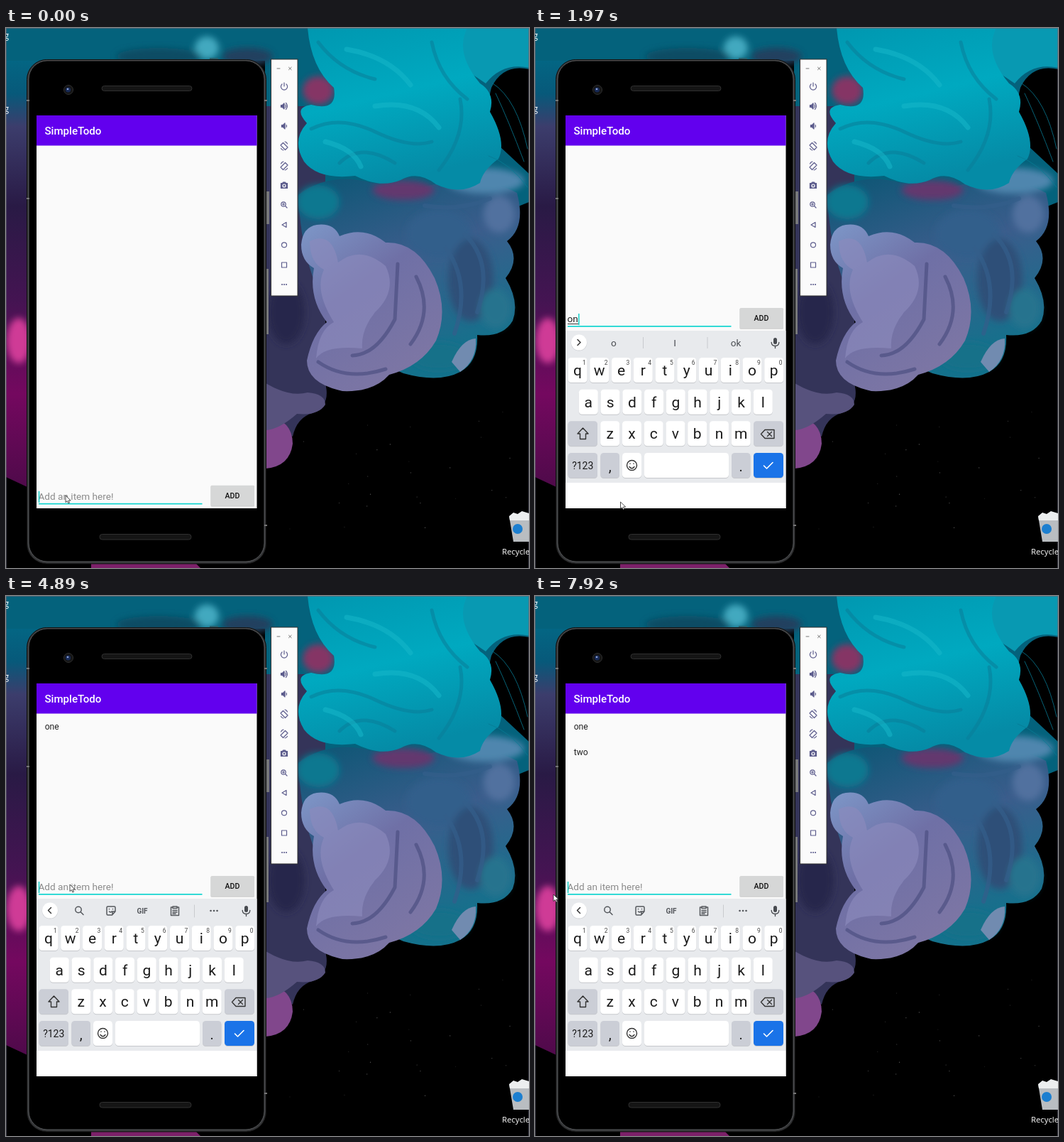
Recreate the animation shown at these times as an HTML page. Size 737x760 px, loop 8 s.

```html
<!DOCTYPE html>
<html lang="en">
<head>
<meta charset="utf-8">
<title>Todo list on a phone emulator</title>
<style>
html, body { margin: 0; width: 100%; height: 100%; overflow: hidden; background: #000; }
svg { display: block; width: 737px; height: 760px; }
text { font-family: Roboto, sans-serif; white-space: pre; }
.mid { text-anchor: middle; }
.line { fill: none; stroke-linecap: round; stroke-linejoin: round; }
</style>
</head>
<body>
<svg viewBox="0 0 737 760">
  <defs>
    <linearGradient id="left" gradientUnits="userSpaceOnUse" x1="0" y1="0" x2="0" y2="660">
      <stop offset="0" stop-color="#00728c"/><stop offset=".14" stop-color="#07597a"/>
      <stop offset=".21" stop-color="#3c3d6c"/><stop offset=".38" stop-color="#291a45"/>
      <stop offset=".58" stop-color="#441452"/><stop offset=".78" stop-color="#74085f"/>
      <stop offset="1" stop-color="#4b0a48"/>
    </linearGradient>
    <linearGradient id="cyan" x1="0" y1="0" x2=".3" y2="1">
      <stop offset="0" stop-color="#0097b0"/><stop offset=".5" stop-color="#00a9c0"/><stop offset="1" stop-color="#058ba6"/>
    </linearGradient>
    <linearGradient id="violet" x1="0" y1="0" x2=".6" y2="1">
      <stop offset="0" stop-color="#7d97c8"/><stop offset=".45" stop-color="#6f70a6"/><stop offset="1" stop-color="#7d76a4"/>
    </linearGradient>
    <linearGradient id="blue" x1="0" y1="0" x2=".4" y2="1">
      <stop offset="0" stop-color="#0b5674"/><stop offset=".5" stop-color="#3b5d8c"/><stop offset="1" stop-color="#14718c"/>
    </linearGradient>
    <filter id="soft" x="-20%" y="-20%" width="140%" height="140%"><feGaussianBlur stdDeviation="5"/></filter>
    <clipPath id="screen"><rect x="43" y="123" width="310.5" height="553"/></clipPath>
  </defs>

  <!-- wallpaper -->
  <rect width="737" height="760"/>
  <path fill="url(#left)" d="M0 0H60V660L0 632Z"/>
  <path fill="#04627c" d="M0 0H737V58Q700 50 684 84Q674 120 694 165L737 205V245L600 300H365V46H0Z"/>
  <path fill="#343459" d="M360 110H450V500Q458 532 432 542Q410 548 404 575L366 560Z"/>
  <path fill="#81478c" d="M366 545Q404 552 404 585Q400 617 366 620Z"/>
  <path fill="#57527d" d="M366 500Q400 520 425 513Q450 515 450 530Q440 546 410 543Q385 565 366 566Z"/>
  <path fill="url(#blue)" d="M412 235Q470 190 560 235Q650 195 720 232Q733 280 706 300Q726 325 704 352Q724 385 714 412Q700 436 664 432Q666 470 640 484Q610 500 560 486Q420 430 412 235Z"/>
  <g filter="url(#soft)">
    <ellipse cx="283" cy="28" rx="17" ry="16" fill="#43a9bf"/>
    <ellipse cx="215" cy="40" rx="60" ry="12" fill="#0b4c63"/>
    <ellipse cx="340" cy="40" rx="36" ry="12" fill="#24405f"/>
    <ellipse cx="18" cy="440" rx="17" ry="32" fill="#cf3a96"/>
    <ellipse cx="440" cy="88" rx="22" ry="20" fill="#853465"/>
    <ellipse cx="560" cy="228" rx="44" ry="14" fill="#64386e"/>
    <ellipse cx="440" cy="245" rx="30" ry="24" fill="#0a7890"/>
    <ellipse cx="675" cy="215" rx="55" ry="18" fill="#4f86ae"/>
    <ellipse cx="695" cy="262" rx="22" ry="26" fill="#51719f"/>
    <ellipse cx="610" cy="290" rx="46" ry="34" fill="#315f8b"/>
    <ellipse cx="655" cy="355" rx="32" ry="58" fill="#2e5078"/>
    <ellipse cx="690" cy="395" rx="22" ry="28" fill="#28738e"/>
    <ellipse cx="610" cy="462" rx="42" ry="20" fill="#127189"/>
    <ellipse cx="395" cy="400" rx="26" ry="45" fill="#28284c"/>
  </g>
  <path fill="#0899b2" d="M640 0H737V56Q700 48 676 78Q650 60 632 50Z"/>
  <path fill="url(#cyan)" d="M425 0H650Q632 35 668 78Q690 92 682 118Q706 160 694 184Q672 200 668 218Q640 236 606 220Q580 200 556 214Q528 226 492 208Q440 214 420 188Q402 158 424 134Q404 112 430 108Q468 118 462 84Q430 56 425 0Z"/>
  <path class="line" stroke="#0a7f99" stroke-width="5" opacity=".55" d="M440 20Q470 60 520 72M430 142Q470 122 520 146T600 160M470 190Q500 160 548 190M610 200Q650 150 640 100M600 20Q610 70 650 100"/>
  <path class="line" stroke="#18b9cc" stroke-width="7" opacity=".5" d="M480 30Q540 40 570 80M520 110Q580 100 610 140M450 160Q490 170 500 195"/>
  <path class="line" stroke="#087b94" opacity=".8" d="M686 78Q720 100 735 170M690 92Q708 130 730 188M680 180Q710 190 735 224"/>
  <path fill="url(#violet)" d="M416 305Q418 280 438 277Q462 274 470 293Q505 278 535 302Q578 300 604 352Q624 398 606 440Q585 476 540 488Q518 513 474 511Q424 500 424 468Q432 430 452 414Q426 380 434 338Q416 328 416 305Z"/>
  <path fill="#8c8bbd" opacity=".65" d="M428 300Q460 285 468 330Q500 305 535 335Q552 370 520 400Q500 425 502 451Q450 446 437 465Q440 425 462 414Q434 370 448 340Q428 330 428 300Z"/>
  <path class="line" stroke="#4b4d80" stroke-width="5" opacity=".65" d="M552 332Q550 374 548 410Q522 460 488 461M578 350Q604 400 570 445M440 470Q480 498 535 480"/>
  <path class="line" stroke="#345f8a" stroke-width="6" opacity=".7" d="M620 310Q656 360 632 430M646 290Q688 330 664 400M590 250Q640 258 682 240"/>
  <path fill="#718bb0" d="M628 470Q642 438 662 437Q664 468 640 484Z"/>
  <path fill="#7c2069" d="M120 760V754H268L274 760Z"/>
  <g id="stars" fill="#555"></g>
  <path class="line" stroke="#667" stroke-opacity=".6" d="M0 .5H736.5V760M.5 0V760"/>

  <!-- desktop icons -->
  <g fill="#fff">
    <text x="4" y="15" font-size="12" text-anchor="end" style="font-family:'Open Sans',sans-serif">g</text>
    <text x="4" y="118" font-size="12" text-anchor="end" style="font-family:'Open Sans',sans-serif">g</text>
    <text x="699" y="741" font-size="11.3" style="font-family:'Open Sans',sans-serif">Recycle</text>
  </g>
  <path fill="#b9bdc1" d="M709 687H737V723H715Z"/>
  <path fill="#eceeef" d="M709 687L715 682 721 684 727 680 737 683V693H710Z"/>
  <circle cx="721" cy="705" r="7" fill="#1c7fd0"/>

  <!-- phone -->
  <path fill="#77787a" d="M365 230H371V276H365ZM365 339H370V431H365Z"/>
  <rect x="287" y="42" width="12" height="4" fill="#27606e"/>
  <rect x="29.5" y="44.5" width="337" height="709.5" rx="28" fill="#343537" stroke="#111"/>
  <rect x="32" y="46" width="332" height="705" rx="26" stroke="#686a6c" stroke-width=".8"/>
  <path stroke="#777" stroke-width="2" d="M29 102H33M29 240H33M364 102H368M364 700H368"/>
  <g fill="#151515" stroke="#303030">
    <rect x="135" y="81.5" width="127" height="7" rx="3.5"/>
    <rect x="132" y="712.5" width="129" height="7.5" rx="3.5"/>
    <circle cx="88" cy="87" r="6.5"/>
  </g>
  <circle cx="87.5" cy="87" r="3.6" fill="#172955"/><circle cx="87" cy="86" r="1.3" fill="#8ea4dc"/>

  <g clip-path="url(#screen)">
    <rect x="43" y="123" width="311" height="553" fill="#fafafa"/>
    <rect x="43" y="123" width="311" height="42.5" fill="#6200ee"/>
    <text x="54.5" y="150" font-size="15.1" font-weight="500" fill="#fff">SimpleTodo</text>
    <g font-size="12.1" fill="#222">
      <text id="item1" x="54.7" y="188">one</text>
      <text id="item2" x="54.7" y="224">two</text>
    </g>
    <g id="entry">
      <rect x="46" y="419" width="230.5" height="1.7" fill="#10d5d0"/>
      <text id="hint" x="45.5" y="414" font-size="13.6" fill="#8b8b8b">Add an item here!</text>
      <text id="typed" x="45.5" y="414" font-size="13.6" fill="#222"></text>
      <rect id="under" x="46" y="416" height="1" fill="#333"/>
      <rect id="caret" y="402" width="1.5" height="16" fill="#10cfc8"/>
      <rect x="288.5" y="394.7" width="61.5" height="29" rx="1.5" fill="#ccc"/>
      <rect id="button" x="288.5" y="394" width="61.5" height="28.8" rx="1.5"/>
      <text class="mid" x="319" y="412" font-size="10.6" font-weight="500" fill="#111">ADD</text>
    </g>
    <g id="board">
      <rect x="43" y="426" width="311" height="214" fill="#e8eaed"/>
      <rect x="43" y="640" width="311" height="100" fill="#fff"/>
      <g id="keys"></g>
      <g class="line" stroke="#333" stroke-width="1.4">
        <path d="M67.5 563L60 571H63.5V578.5H71.5V571H75Z"/>
        <path d="M324 565.5H337V577.5H324L318.5 571.5ZM327.5 568.5L333.5 574.5M333.5 568.5L327.5 574.5"/>
        <circle cx="136.5" cy="615.5" r="7"/>
        <path d="M133 617.5Q136.5 622 140 617.5M134 613V613.2M139 613V613.2"/>
        <path stroke="#fff" stroke-width="1.6" d="M322.5 616L326.5 620 335 611.5"/>
      </g>
      <circle cx="62" cy="443.3" r="11.3" fill="#cfd1d5"/><circle cx="62" cy="442.6" r="11" fill="#fff"/>
      <g fill="#484b50">
        <rect x="336" y="436" width="5" height="9" rx="2.5"/>
        <path class="line" style="fill:none" stroke="#484b50" stroke-width="1.4" d="M333.2 442.5Q333.5 447.5 338.5 447.5T343.8 442.5M338.5 448V450.5"/>
      </g>
      <g id="tools" class="line" stroke="#55585d" stroke-width="1.5">
        <path stroke="#333" d="M63.5 438.5L59.5 442.5 63.5 446.5"/>
        <circle cx="102" cy="441.5" r="4.2"/><path d="M105.2 444.8L109 448.5"/>
        <path d="M143.5 437H152.5Q154 437 154 438.5V444L149.5 449H143.5Q142 449 142 447.5V438.5Q142 437 143.5 437ZM154 444H150V448.5M145.5 440.5V440.8M150.5 440.5V440.8M145.5 444Q147.5 446 149 444"/>
        <path d="M234 438H232.5V449.5H243.5V438H242M235 437H241V439.5H235ZM235 442.5H241M235 445H241M235 447.2H239"/>
        <path stroke="#c8cace" stroke-width="1" d="M265.5 435V452"/>
        <path stroke-width="2.6" d="M288.5 443H288.6M293 443H293.1M297.5 443H297.6"/>
        <text class="mid" x="192" y="446.5" font-size="10" font-weight="700" stroke="none" fill="#55585d">GIF</text>
      </g>
      <g id="hints">
        <path class="line" stroke="#333" stroke-width="1.5" d="M60 438.5L64 442.5 60 446.5"/>
        <path stroke="#c8cace" d="M152.5 435V451M243 435V451"/>
        <g font-size="13.6" fill="#4b4e53">
          <text class="mid word" x="111" y="448"></text>
          <text class="mid word" x="197" y="448"></text>
          <text class="mid word" x="283" y="448"></text>
        </g>
      </g>
    </g>
  </g>

  <!-- emulator controls -->
  <rect x="373.5" y="44" width="37.5" height="333" fill="#fbfbfb" stroke="#333"/>
  <g class="line" stroke="#5d5d8d" stroke-width="1.2">
    <path stroke="#777" stroke-width="1" d="M382 57H386M398.5 55.2L402.2 58.8M402.2 55.2L398.5 58.8"/>
    <path d="M389 79A4.6 4.6 0 1 0 395 79M392 77V82"/>
    <path fill="#5d5d8d" d="M387.5 108.5H389.5L392 106V114L389.5 111.5H387.5ZM388.5 136.5H390.5L393 134V142L390.5 139.5H388.5Z"/>
    <path d="M393.8 108Q395.4 110 393.8 112M394.5 105.5Q398.5 110 394.5 114.5M395 136.5Q396 138 395 139.5"/>
    <path id="turn" d="M390.5 161.5L397 168 393.5 171.5 387 165ZM387.5 169.5Q388.5 171.5 391 172M393 160Q395.5 160.5 396.5 163"/>
    <path d="M393.5 189.5L387 196 390.5 199.5 397 193ZM396.5 197.5Q395.5 199.5 393 200M391 188Q388.5 188.5 387.5 191"/>
    <path fill="#5d5d8d" d="M387.5 218.5H389.5L390.5 217H393.5L394.5 218.5H396.5V225.5H387.5Z"/>
    <circle cx="392" cy="222" r="2" stroke="#fff"/>
    <circle cx="391" cy="248" r="3.2"/><path d="M393.5 250.5L396 253M389.5 248H392.5M391 246.5V249.5"/>
    <path d="M395 273.5V280.5L389 277Z"/><circle cx="392" cy="305.3" r="3.5"/><path d="M388.5 330H395.5V337H388.5Z"/>
    <path stroke-width="2" d="M389 361H389.1M392 361H392.1M395 361H395.1"/>
  </g>

  <path id="mouse" fill="#fff" stroke="#222" stroke-width=".8" d="M0 0V9.6L2.3 7.6 3.9 11 5.5 10.3 4 7H7.2Z"/>
</svg>
<script>
const $ = id => document.getElementById(id);
const LOOP = 8000;

// Each timeline is a list of [time, value...]; a value holds until the next time.
const typing = [[0, ''], [1850, 'o'], [1970, 'on'], [2220, 'one'], [4000, ''],
  [5530, 't'], [5920, 'tw'], [6040, 'two'], [7660, '']];
const words = [[0, ''], [1970, 'o I ok'], [2220, 'on in one'], [2340, 'one once ones'], [4140, ''],
  [5650, 't the to'], [5920, 'tw two to'], [6160, 'two to yep'], [7800, '']];
const caretFlips = [460, 580, 1100, 1600, 2750, 3310, 3850, 4000, 4500, 4890, 5410, 5530, 6540, 7040, 7540, 7660];
const presses = [[0, 0], [4000, 1], [4500, 0], [7660, 1], [7920, 0]];
const mouse = [[0, 84, 658], [120, 98, 665], [310, 114, 674], [580, 117, 674], [700, 118, 673], [850, 120.5, 667],
  [2750, 160, 650], [2870, 211, 608], [3020, 225, 549], [3170, 249, 448], [3310, 268, 446], [3460, 335, 412],
  [3610, 328, 411], [3730, 322, 410], [3850, 320, 408], [4260, 250, 420], [4380, 150, 428], [4500, 80, 423],
  [4650, 84, 415], [4770, 88, 409], [4890, 90, 406], [6660, 110, 405], [6800, 180, 400], [6920, 280, 402],
  [7040, 322, 406], [7800, 200, 412], [7920, 26, 420]];

const at = (line, t) => line.findLast(step => step[0] <= t);
const show = (id, on) => $(id).style.display = on ? '' : 'none';

function key(x, y, w, fill, label = '', size = 21, base = 25) {
  const box = (dy, c) => `<rect x="${x}" y="${y + dy}" width="${w}" height="35" rx="4.5" fill="${c}"/>`;
  return box(1, '#c6c8cc') + box(0, fill) +
    `<text class="mid" x="${x + w / 2}" y="${y + base}" font-size="${size}" fill="#1b1b1b">${label}</text>`;
}

function buildKeys() {
  const grey = '#cbced6';
  let out = '';
  [['qwertyuiop', 46.5, 464], ['asdfghjkl', 61.8, 508.7], ['zxcvbnm', 92.2, 553.3]].forEach(([row, x0, y]) =>
    [...row].forEach((c, i) => {
      const x = x0 + i * 30.75;
      out += key(x, y, 27, '#fff', c);
      if (y === 464) out += `<text class="mid" x="${x + 22.8}" y="473.5" font-size="8.5" fill="#444">${(i + 1) % 10}</text>`;
    }));
  out += key(46.5, 553.3, 41.5, grey) + key(308, 553.3, 42, grey)
    + key(46.5, 598, 41.5, grey, '?123', 14, 22.5) + key(92.3, 598, 26.7, grey, ',', 20, 26)
    + key(123, 598, 27, '#fff') + key(154, 598, 119, '#fff')
    + key(277, 598, 26.5, grey, '.', 20, 26) + key(308, 598, 42, '#1a73e8');
  $('keys').innerHTML = out;
}

function buildStars() {
  let out = '', seed = 7;
  const rnd = () => (seed = seed * 16807 % 2147483647) / 2147483647;
  for (let i = 0; i < 26; i++)
    out += `<circle cx="${400 + rnd() * 330}" cy="${530 + rnd() * 190}" r="${.3 + rnd() * .4}"/>`;
  $('stars').innerHTML = out;
}

function draw(t) {
  const text = at(typing, t)[1], list = at(words, t)[1];
  const open = t >= 310;
  $('typed').textContent = text;
  const width = text ? $('typed').getComputedTextLength() : 0;
  $('under').setAttribute('width', width);
  $('caret').setAttribute('x', 45.8 + width);
  show('caret', caretFlips.filter(f => f <= t).length % 2 === 0);
  show('hint', !text);
  show('item1', t >= 4000);
  show('item2', t >= 7660);
  show('board', open);
  $('board').setAttribute('transform', `translate(0 ${t < 460 ? 40 : 0})`);
  $('entry').setAttribute('transform', `translate(0 ${open ? 0 : 249.8})`);
  $('button').setAttribute('fill', at(presses, t)[1] ? '#bfc0c0' : '#d6d7d7');
  show('tools', !list);
  show('hints', list);
  const parts = list.split(' ');
  document.querySelectorAll('.word').forEach((el, i) => el.textContent = parts[i] || '');
  const [, x, y] = at(mouse, t);
  $('mouse').setAttribute('transform', `translate(${x} ${y})`);
}

buildKeys();
buildStars();
const start = performance.now();
function frame(now) {
  draw(Math.max(0, now - start) % LOOP);
  requestAnimationFrame(frame);
}
draw(0);
requestAnimationFrame(frame);
</script>
</body>
</html>
```
